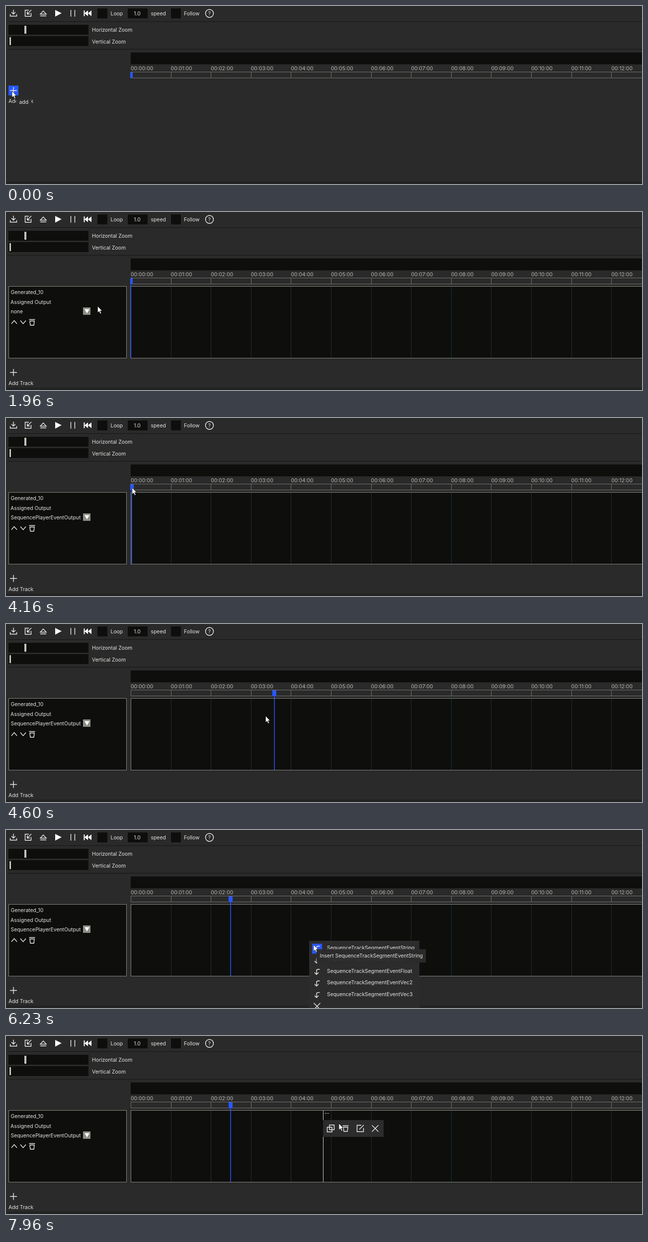
Write an HTML page that moves like this. It is 1280 px wide and 360 px high and loops after 8000 ms.

```html
<!DOCTYPE html>
<html lang="en">
<head>
<meta charset="utf-8">
<title>Sequencer</title>
<style>
  html, body { margin: 0; width: 100%; height: 100%; overflow: hidden; background: #2a2a2a; }
  svg { display: block; width: 1280px; height: 360px; }
  text { font: 10.4px Inter, "Open Sans", sans-serif; fill: #e4e4e0; white-space: pre; }
  rect, .crisp { shape-rendering: crispEdges; }
  .dark { fill: #0e0e0d; }
  .grab { fill: #c4c4bc; }
  .icon { fill: none; stroke: #ededea; stroke-width: 1.4; }
  .solid { fill: #fff; }
  .blue { fill: #2958ff; }
  .panel { fill: #2c2c2d; }
  .frame { fill: none; stroke: #85857f; }
  .mark { stroke: #d2d2cc; }
  #ruler text { fill: #bcbcb6; }
</style>
</head>
<body>
<svg viewBox="0 0 1280 360">
  <defs>
    <path id="plus" class="icon" d="M-7 0H7M0 -7V7"/>
    <path id="cross" class="icon" d="M-6.5 -6.5L6.5 6.5M6.5 -6.5L-6.5 6.5"/>
    <path id="hook" class="icon" d="M5.5 -5H2Q-1 -5 -1 -2V5.5M-5 1.5L-1 5.5L3 1.5"/>
    <path id="bin" class="icon" d="M-6 -5.5H6M-4.5 -2.5H4.5L3.5 6H-3.5Z"/>
    <path id="copy" class="icon" d="M-7 -2.5H2.5V7H-7ZM-2.5 -7H7V2.5H-2.5Z"/>
    <path id="edit" class="icon" d="M2 -6.5H-6.5V6.5H6.5V-1M7 -7L-2 2"/>
  </defs>

  <rect width="1280" height="360" fill="#2a2a2a"/>
  <rect y="355" width="1280" height="5" fill="#232324"/>
  <path class="crisp" stroke="#161616" d="M2 31.5H1280M2 87.5H1280"/>

  <g class="icon">
    <path d="M15 7.5V16.500M11 12.500L15 16.500L19 12.500M8.500 16.500V20.500H21.500V16.500"/>
    <path d="M46 8.500H38.500V20.800H50.500V14M51 8L43 16M42.800 11V16.300H48"/>
    <path d="M69 16.500L75 10L81 16.500ZM69 20H81"/>
    <path d="M130.500 8V21.500M138.500 8V21.500"/>
    <circle cx="409.500" cy="15" r="8"/>
  </g>
  <path class="solid" d="M99 8L112 14.500L99 21.500ZM156.500 9H158.500V20.500H156.500ZM165 9V20.500L158 14.700ZM172 9V20.500L165 14.700Z"/>
  <rect class="dark" x="184" y="5" width="20" height="20"/>
  <rect class="dark" x="245" y="5" width="40" height="20"/>
  <rect class="dark" x="332" y="5" width="20" height="20"/>
  <text x="210.500" y="19">Loop</text>
  <text x="264" y="19" text-anchor="middle">1.0</text>
  <text x="291.500" y="19">speed</text>
  <text x="358" y="19">Follow</text>
  <text x="409.500" y="19" text-anchor="middle">?</text>

  <rect class="dark" x="5" y="38" width="161" height="20"/>
  <rect class="dark" x="5" y="61" width="161" height="20"/>
  <rect class="grab" x="37" y="40" width="4" height="16"/>
  <rect class="grab" x="7" y="63" width="3" height="16"/>
  <text x="173" y="52">Horizontal Zoom</text>
  <text x="173" y="75.500">Vertical Zoom</text>

  <rect class="dark" x="251" y="94" width="1029" height="24"/>
  <g id="ruler"><path class="crisp" stroke="#72726e" d="M251 133.500H1280M251 145.500H1280M251.500 133V146"/></g>

  <g id="add">
    <rect id="addHot" class="blue" x="5" y="161" width="20" height="20"/>
    <use href="#plus" x="15" y="171"/>
    <text x="5" y="196">Add Track</text>
  </g>

  <g id="track">
    <rect class="dark" x="5" y="150" width="238" height="145"/>
    <rect class="frame" x="5.500" y="150.500" width="237" height="144.500"/>
    <rect class="dark" x="251" y="150" width="1040" height="145"/>
    <g id="grid"></g>
    <rect class="frame" x="251.500" y="150.500" width="1040" height="144.500"/>
    <text x="9.500" y="166">Generated_10</text>
    <text x="9" y="186">Assigned Output</text>
    <text id="output" x="9.500" y="205"></text>
    <rect x="155" y="193" width="15" height="15" fill="#8e8e86"/>
    <path class="solid" d="M158 196.500H168L163 205Z"/>
    <path class="icon" d="M11 226L16.500 219.500L22 226M29 219.500L34.500 226L40 219.500"/>
    <use href="#bin" x="52.500" y="223"/>
  </g>

  <g id="segment" class="crisp">
    <path class="mark" d="M0 151V295"/>
    <text x="2.500" y="159.500">--</text>
  </g>
  <path id="hover" class="mark crisp" d="M0 151V295"/>
  <clipPath id="stage"><rect x="250" y="130" width="1030" height="166"/></clipPath>
  <g clip-path="url(#stage)">
    <g id="head">
      <rect class="blue" x="-4" y="134" width="8" height="11.500"/>
      <path id="headLine" stroke="#2958ff" stroke-width="1.500" d="M0 145V295"/>
    </g>
  </g>

  <g id="combo">
    <rect class="panel" x="9" y="208" width="162" height="32"/>
    <rect id="comboHot" class="blue" x="9" width="162" height="16"/>
    <text x="12" y="220">none</text>
    <text x="12" y="236">SequencePlayerEventOutput</text>
  </g>
  <g id="trackMenu"></g>
  <g id="segmentMenu"></g>
  <g id="actions" transform="translate(638 170)">
    <rect class="panel" width="122" height="34"/>
    <use href="#copy" x="15.500" y="17"/>
    <use href="#bin" x="45.500" y="17"/>
    <use href="#edit" x="75" y="17"/>
    <use href="#cross" x="105" y="17"/>
  </g>

  <g id="tip">
    <rect class="panel" height="26.500" opacity=".95"/>
    <text x="6.500" y="17"></text>
  </g>
  <path id="cursor" fill="#fff" stroke="#111" stroke-width=".7" d="M0 0V13L3 10.300L5.200 15.200L7.300 14.200L5.200 9.500H9Z"/>
</svg>

<script>
const LOOP = 8000, LAG = 33, LEFT = 251.5, SECOND = 80.6, ROW = 23.4;
const $ = id => document.getElementById(id);
const show = (id, on) => { $(id).style.display = on ? '' : 'none'; };
const place = (id, x, y = 0) => $(id).setAttribute('transform', `translate(${x} ${y})`);
const during = (t, from, to) => t >= from && t < to;
const pad = n => String(n).padStart(2, '0');

// Pointer waypoints: time, x, y
const path = [
  [460, 12, 172], [840, 13, 230], [960, 24, 234], [1330, 24, 234],
  [1400, 113, 210], [1800, 113, 210], [1960, 184.5, 190.5], [2300, 165, 202],
  [2830, 165, 202], [3060, 135.5, 231], [3500, 135.5, 231], [3780, 256, 190],
  [3960, 253, 141], [4160, 253, 141], [4520, 566, 184], [4600, 523, 186],
  [4730, 452, 190], [4960, 550, 215], [5000, 553, 216], [5100, 610, 224],
  [5330, 610, 224], [5395, 622, 248], [5430, 622.5, 252], [5500, 621, 254],
  [5730, 621, 254], [5790, 615, 253.5], [5960, 615, 232], [6130, 615, 232],
  [6260, 620, 232], [6530, 620, 232], [6800, 660, 229], [6900, 660, 229],
  [7230, 611, 178], [7400, 611, 178], [7530, 638.5, 170], [7860, 638.5, 170],
  [7960, 670, 177]
];

function pointer(t) {
  const i = path.findIndex(p => p[0] > t);
  const b = path[i < 0 ? path.length - 1 : i];
  const a = i > 0 ? path[i - 1] : b;
  const k = a === b ? 0 : (t - a[0]) / (b[0] - a[0]);
  return { x: a[1] + (b[1] - a[1]) * k, y: a[2] + (b[2] - a[2]) * k };
}

function clock(x) {
  const c = Math.max(0, Math.floor((x - LEFT) / SECOND * 100));
  return [c / 6000, c / 100 % 60, c % 100].map(n => pad(Math.floor(n))).join(':');
}

function buildRuler() {
  let ticks = '', lines = '';
  for (let i = 0; i < 13; i++) {
    const x = LEFT + i * SECOND, edge = Math.floor(x) + .5;
    ticks += `<text x="${x - .5}" y="130">00:${pad(i)}:00</text>`;
    if (!i) continue;
    ticks += `<path class="crisp" stroke="#72726e" d="M${edge} 134V145"/>`;
    lines += `<path class="crisp" stroke="${i === 8 ? '#0c3a40' : '#2b2b2a'}" d="M${edge} 151V295"/>`;
  }
  $('ruler').innerHTML += ticks;
  $('grid').innerHTML = lines;
}

function makeMenu(id, x, y, width, names) {
  $(id).innerHTML = `<rect class="panel" width="${width}" height="148"/>
    <rect class="blue" x="6" width="20" height="20"/>` +
    names.map((name, i) => `<use href="#hook" x="16" y="${16 + i * ROW}"/>
      <text x="36" y="${18 + i * ROW}">${name}</text>`).join('') +
    '<use href="#cross" x="16" y="132.500"/>';
  place(id, x, y);
  const hot = $(id).querySelector('.blue');
  return p => {
    const top = p.y - y - 6, row = Math.floor(top / ROW);
    const inside = p.x >= x + 6 && p.x < x + 26 && row >= 0 && row < names.length && top - row * ROW < 20;
    hot.style.display = inside ? '' : 'none';
    hot.setAttribute('y', 6 + row * ROW);
    return inside ? 'Insert ' + names[row] : '';
  };
}

function setTip(text, x, y) {
  show('tip', text);
  if (!text) return;
  const [box, label] = $('tip').children;
  if (label.textContent !== text) label.textContent = text;
  box.setAttribute('width', label.getComputedTextLength() + 12.5);
  place('tip', x, y);
}

const hoverTrackMenu = makeMenu('trackMenu', 12, 174, 175, [
  'SequenceTrackCurveFloat', 'SequenceTrackCurveVec2', 'SequenceTrackEvent',
  'SequenceTrackCurveVec3', 'SequenceTrackCurveVec4']);
const hoverSegmentMenu = makeMenu('segmentMenu', 610, 224, 222,
  ['String', 'Int', 'Float', 'Vec2', 'Vec3'].map(n => 'SequenceTrackSegmentEvent' + n));

function render(t) {
  const p = pointer(t), ui = pointer(t - LAG);
  const hasTrack = t >= 1330;
  const adding = during(t, 30, 1330), inserting = during(t, 5115, 6530);
  const choosing = during(t, 2530, 3500), acting = t >= 7700;
  const seeking = during(t, 4160, 4763), dragging = during(t, 7400, 7700);

  show('track', hasTrack);
  show('headLine', hasTrack);
  show('addHot', t < 100);
  place('add', 0, hasTrack ? 153.5 : 0);
  $('output').textContent = t < 3500 ? 'none' : 'SequencePlayerEventOutput';

  const head = t < 4160 ? LEFT - .5 : Math.max(LEFT - .5, pointer(Math.min(t, 4763) - LAG).x);
  place('head', head);

  show('combo', choosing);
  $('comboHot').setAttribute('y', ui.y < 224 ? 208 : 224);
  show('comboHot', ui.y >= 208);

  show('trackMenu', adding);
  show('segmentMenu', inserting);
  show('actions', acting);

  const seg = t < 7400 ? 609.5 : Math.min(638.5, ui.x - .5 + (t > 7560 ? 1 : 0));
  show('segment', t >= 6530);
  place('segment', seg);

  const inTrack = ui.x > LEFT && ui.y > 150 && ui.y < 295;
  const free = hasTrack && !choosing && !inserting && !acting && !seeking;
  const hovering = free && inTrack;
  const onSegment = t >= 7230;
  show('hover', hovering && !onSegment);
  place('hover', Math.floor(ui.x - .5) + .5);

  if (t < 30) setTip('add', 20, 181);
  else if (adding) setTip(hoverTrackMenu(ui), ui.x + 8, ui.y + 9);
  else if (inserting) setTip(hoverSegmentMenu(ui), ui.x + 7.5, ui.y + 9);
  else if (hovering) setTip(clock(onSegment || dragging ? seg : ui.x - 1), ui.x - 1, ui.y + 4);
  else setTip('');

  place('cursor', p.x, p.y);
}

buildRuler();
const start = performance.now();
function frame() {
  render((performance.now() - start) % LOOP);
  requestAnimationFrame(frame);
}
frame();
</script>
</body>
</html>
```
